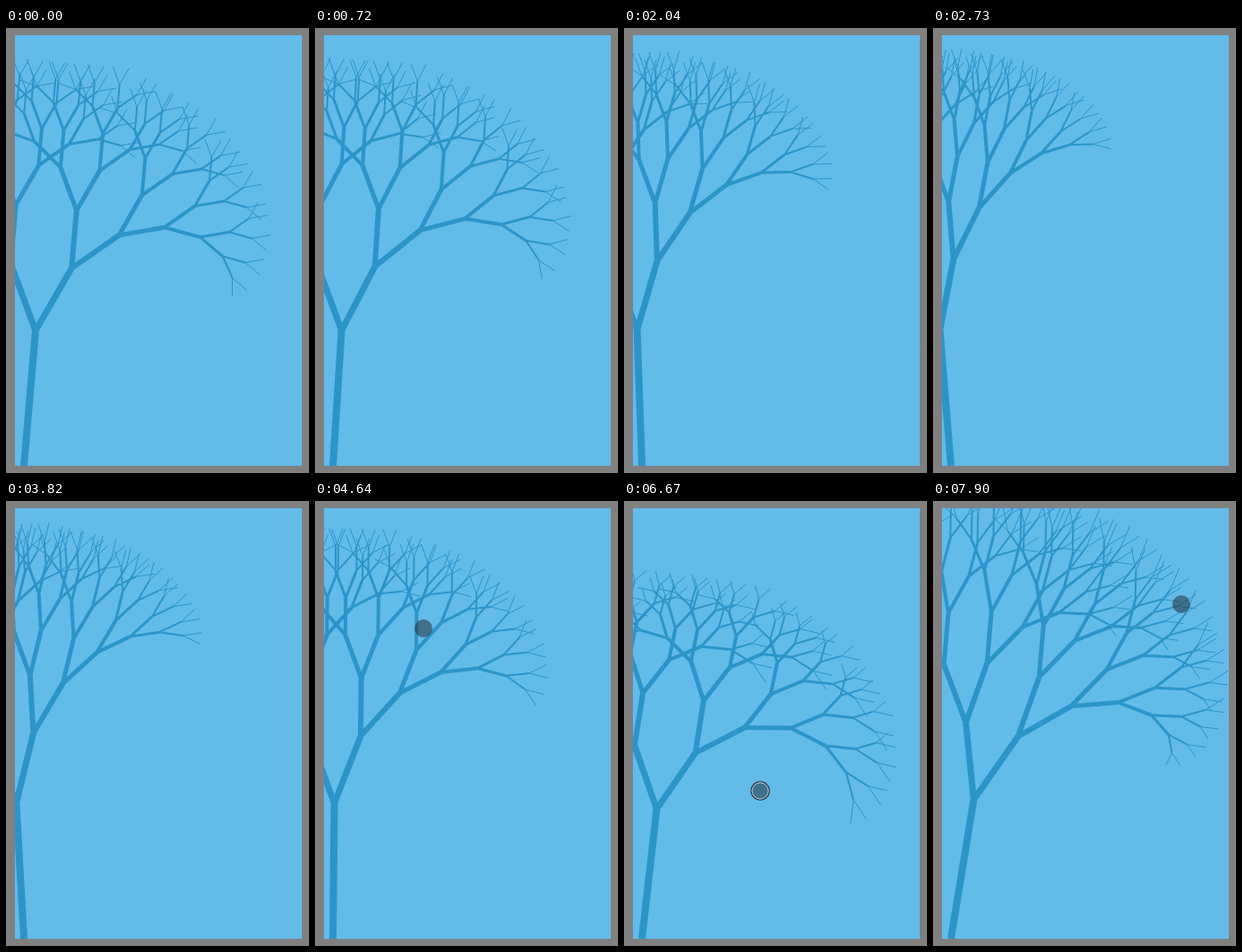
Recreate the animation shown at these times as an HTML page. Size 338 by 496 pixels, loop 8 s.

```html
<!DOCTYPE html>
<html lang="en">
<head>
<meta charset="utf-8">
<title>Swaying tree</title>
<style>
  html, body { margin: 0; width: 100%; height: 100%; overflow: hidden; background: #808080; }
  svg { display: block; width: 338px; height: 496px; }
</style>
</head>
<body>
<svg viewBox="0 0 338 496">
  <clipPath id="sky"><rect x="10" y="8" width="320" height="480"/></clipPath>
  <rect width="338" height="496" fill="#808080"/>
  <rect x="10" y="8" width="320" height="480" fill="#63bbea"/>
  <g id="tree" clip-path="url(#sky)" fill="none" stroke="#2c94c9"/>
  <g id="pointer">
    <circle r="10" fill="#222c30" fill-opacity=".52"/>
    <g id="ring" fill="none">
      <circle r="10.2" stroke="#1d2930" stroke-width="1.1"/>
      <circle r="9.1" stroke="#b9d3e0"/>
    </g>
  </g>
</svg>
<script>
const LOOP = 8000, STEP = 135.2, FIRST = 155, LAST_STEP = 57;
const LEVELS = 8, TRUNK = 151, BRANCH = 80.5, SHRINK = 0.8;
const GRAB = 5450, GRAB_TIME = 240, LAG = 700;

// Pointer stops: time, x, y
const STOPS = [
  [4080, 324, 90],
  [4617, 121, 142],
  [5698, 224, 217],
  [6645, 152, 323],
  [7600, 155, 195],
  [7860, 277, 115]
];

const byId = id => document.getElementById(id);
const tree = byId("tree"), pointer = byId("pointer"), ring = byId("ring");

const levels = Array.from({ length: LEVELS }, (_, i) => {
  const path = document.createElementNS("http://www.w3.org/2000/svg", "path");
  path.setAttribute("stroke-width", LEVELS - i);
  return tree.appendChild(path);
});

const mix = (a, b, u) => a + (b - a) * u;
const swayAt = t => 4.9 * Math.cos(t / 6000 * 2 * Math.PI);

function ease(u) {
  u = Math.min(1, Math.max(0, u));
  return u * u * (3 - 2 * u);
}

function pointerAt(t) {
  let [, x, y] = STOPS[0];
  for (let i = 1; i < STOPS.length; i++) {
    const [t0] = STOPS[i - 1], [t1, x1, y1] = STOPS[i];
    const u = ease((t - t0) / (t1 - t0));
    x = mix(x, x1, u);
    y = mix(y, y1, u);
  }
  return { x, y };
}

// Dragging delays the sway, bends every fork and pulls every joint.
function pose(t, { x, y }) {
  const grip = ease((t - GRAB) / GRAB_TIME);
  const sway = mix(swayAt(t), swayAt(t - LAG), grip);
  const bend = grip * 5.6 * Math.tanh((x - 146) / 35);
  return {
    lean: sway + 1.35 * bend,
    fork: 20.2 + sway,
    bend,
    pullX: 0.2 * bend,
    pullY: grip * 0.055 * (y - 222)
  };
}

function drawTree({ lean, fork, bend, pullX, pullY }) {
  const lines = levels.map(() => "");
  const grow = (x, y, angle, length, level) => {
    const rad = angle * Math.PI / 180;
    const x2 = x + length * Math.sin(rad) + pullX;
    const y2 = y - length * Math.cos(rad) + pullY;
    lines[level] += `M${x.toFixed(2)} ${y.toFixed(2)}L${x2.toFixed(2)} ${y2.toFixed(2)}`;
    if (level + 1 === LEVELS) return;
    const next = level ? length * SHRINK : BRANCH;
    for (const side of [-1, 1]) grow(x2, y2, angle + side * fork + bend, next, level + 1);
  };
  grow(20, 488, lean, TRUNK, 0);
  levels.forEach((path, i) => path.setAttribute("d", lines[i]));
}

function drawPointer(t, { x, y }) {
  pointer.style.display = t < STOPS[0][0] ? "none" : "";
  pointer.setAttribute("transform", `translate(${x.toFixed(2)} ${y.toFixed(2)})`);
  ring.style.display = t > GRAB && t < 7600 ? "" : "none";
}

// The picture refreshes in steps rather than continuously.
function snap(t) {
  const n = Math.min(LAST_STEP, Math.floor((t - FIRST) / STEP));
  return n < 0 ? 0 : FIRST + n * STEP;
}

const start = performance.now();
function frame() {
  const t = snap((performance.now() - start) % LOOP);
  const spot = pointerAt(t);
  drawTree(pose(t, spot));
  drawPointer(t, spot);
  requestAnimationFrame(frame);
}
frame();
</script>
</body>
</html>
```
